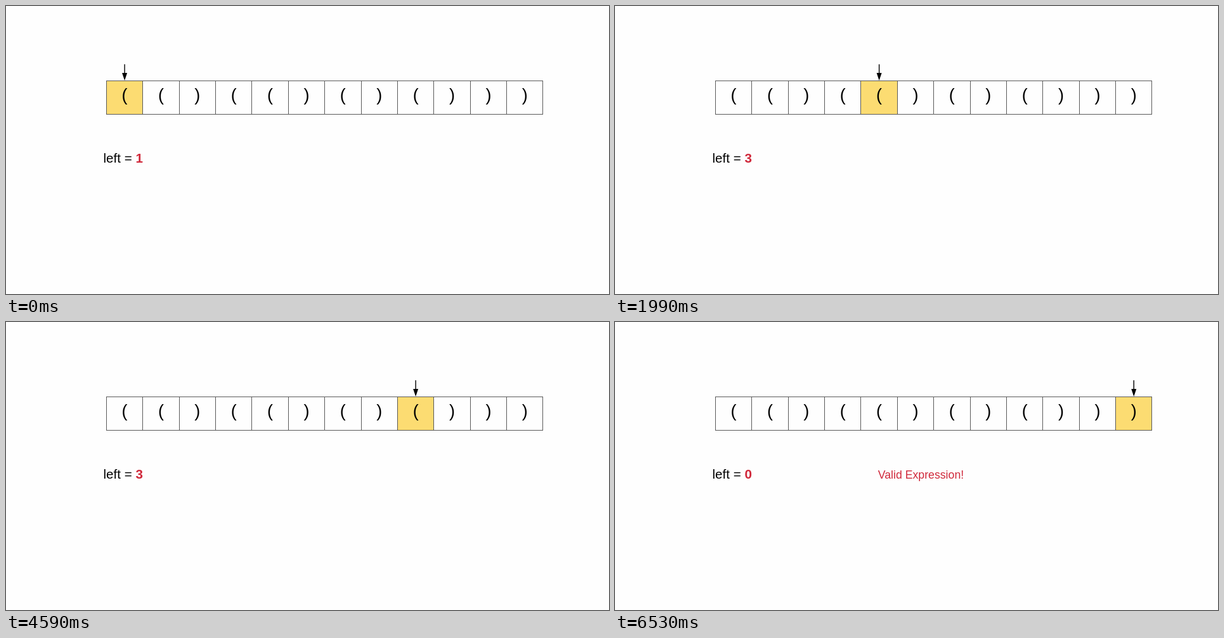
An HTML page with a canvas for the animation above (7150 ms loop, 951 by 456 pixels).

```html
<!DOCTYPE html>
<html lang="en">
<head>
<meta charset="utf-8">
<title>Matching parentheses</title>
<style>
  html, body { margin: 0; width: 100%; height: 100%; overflow: hidden; background: #fefefe; }
  canvas { display: block; }
</style>
</head>
<body>
<canvas id="stage" width="951" height="456"></canvas>
<script>
const ctx = document.getElementById("stage").getContext("2d");
const LOOP = 7150;
const STARTS = [0, 60, 680, 1350, 1990, 2630, 3290, 3930, 4590, 5210, 5870, 6530];
const CELLS = "(()(()()()))";
const LEFT = 158.4, PITCH = 57.38, TOP = 118.5, BOTTOM = 171.5;
const BASELINE = 247.8;
const RED = "#d0293b";
const FAMILY = "'Liberation Sans', Arial, sans-serif";

const edge = i => Math.floor(LEFT + i * PITCH) + 0.5;
const middle = i => LEFT + (i + 0.5) * PITCH;

function write(text, x, y, size, color = "#000", weight = "", align = "left") {
  ctx.font = `${weight} ${size}px ${FAMILY}`;
  ctx.fillStyle = color;
  ctx.textAlign = align;
  ctx.fillText(text, x, y);
  return x + ctx.measureText(text).width;
}

function line(x1, y1, x2, y2, color, width) {
  ctx.strokeStyle = color;
  ctx.lineWidth = width;
  ctx.beginPath();
  ctx.moveTo(x1, y1);
  ctx.lineTo(x2, y2);
  ctx.stroke();
}

function drawArrow(x, tip) {
  line(x, tip - 25.7, x, tip - 10, "#000", 1.4);
  ctx.fillStyle = "#000";
  ctx.beginPath();
  ctx.moveTo(x - 4, tip - 12);
  ctx.lineTo(x + 4, tip - 12);
  ctx.lineTo(x, tip);
  ctx.fill();
}

function drawRow(active) {
  const count = CELLS.length;
  ctx.fillStyle = "#fcdc72";
  ctx.fillRect(edge(active), TOP, edge(active + 1) - edge(active), BOTTOM - TOP);
  for (let i = 0; i <= count; i++) line(edge(i), TOP, edge(i), BOTTOM, "#5a5a5a", 1);
  for (const y of [TOP, BOTTOM]) line(edge(0) - 0.5, y, edge(count) + 0.5, y, "#5a5a5a", 1);
  [...CELLS].forEach((c, i) => write(c, middle(i), 150, 27, "#000", "", "center"));
}

function draw(now) {
  const time = now % LOOP;
  const step = STARTS.findLastIndex(start => start <= time);
  const open = [...CELLS.slice(0, step + 1)].reduce((n, c) => n + (c === "(" ? 1 : -1), 0);

  ctx.fillStyle = "#fefefe";
  ctx.fillRect(0, 0, 951, 456);
  drawRow(step);
  drawArrow(middle(step), TOP - 0.5);
  const end = write("left = ", 153.5, BASELINE, 20.6);
  write(open, end, BASELINE, 20.6, RED, "bold");
  if (step === CELLS.length - 1) write("Valid Expression!", 414.8, BASELINE, 17.7, RED);
}

const start = performance.now();
function tick() {
  draw(performance.now() - start);
  requestAnimationFrame(tick);
}
tick();
</script>
</body>
</html>
```
